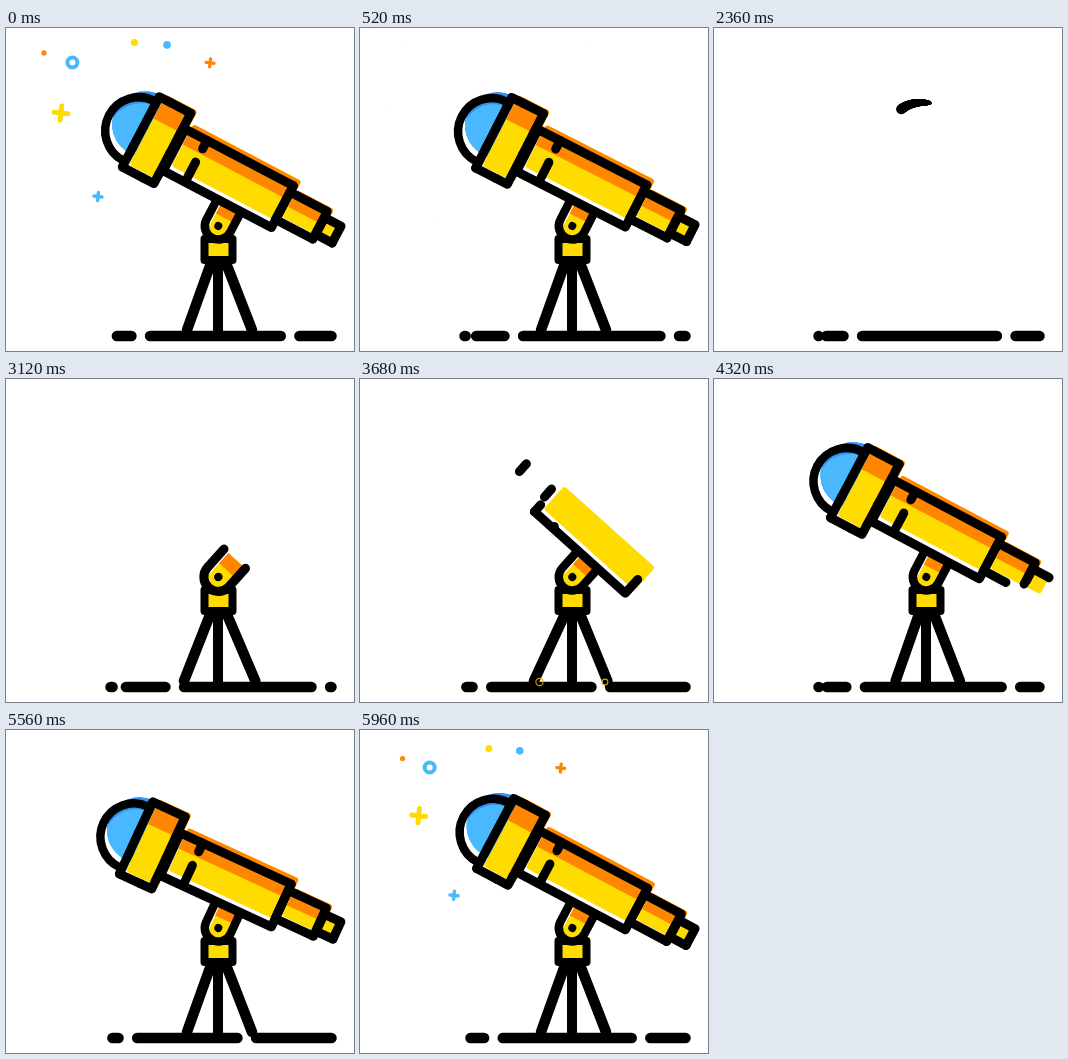
Write an HTML page with a canvas that moves like this. It is 348 by 323 pixels and loops after 6000 ms.

```html
<!DOCTYPE html>
<html lang="en">
<head>
<meta charset="utf-8">
<title>Telescope</title>
<style>
html, body { margin: 0; width: 100%; height: 100%; overflow: hidden; background: #fff; }
canvas { display: block; width: 348px; height: 323px; }
</style>
</head>
<body>
<canvas id="stage"></canvas>
<script>
const LOOP = 6000, START = 1320;
const BLACK = '#000', YELLOW = '#ffdc00', ORANGE = '#ff8600', BLUE = '#4ab8ff', DEEP = '#2f92f0';
const canvas = document.getElementById('stage');
const ratio = window.devicePixelRatio || 1;
canvas.width = 348 * ratio;
canvas.height = 323 * ratio;
const c = canvas.getContext('2d');

const clamp = x => Math.max(0, Math.min(1, x));
const mix = (a, b, p) => a + (b - a) * p;
const span = (t, a, b) => clamp((t - a) / (b - a));
const grow = (t, a, b) => {
  const p = span(t, a, b);
  return p * p * (3 - 2 * p);
};

// Growth from 0 to 1 that overshoots a little.
function pop(t, start, time = 300) {
  const p = span(t, start, start + time) - 1;
  return 1 + 2.7 * p ** 3 + 1.7 * p ** 2;
}

// Damped swing that begins at the given time.
function swing(t, start, half, decay, size, wave = Math.sin) {
  const s = t - start;
  return s < 0 ? 0 : size * wave(Math.PI * s / half) * Math.exp(-s / decay);
}

// Strokes the part of a polyline between two fractions of its length.
function line(points, width = 9, from = 0, to = 1) {
  if (to <= from) return;
  const total = points.slice(1).reduce((sum, [x, y], i) => sum + Math.hypot(x - points[i][0], y - points[i][1]), 0);
  c.beginPath();
  points.forEach(p => c.lineTo(...p));
  if (to - from < 1) {
    c.setLineDash([(to - from) * total, total * 2]);
    c.lineDashOffset = -from * total;
  }
  c.strokeStyle = BLACK;
  c.lineWidth = width;
  c.stroke();
  c.setLineDash([]);
}

function disc(x, y, r, color) {
  c.beginPath();
  c.arc(x, y, Math.max(0, r), 0, 7);
  c.fillStyle = color;
  c.fill();
}

function ring(x, y, r, width, color) {
  c.beginPath();
  c.arc(x, y, r, 0, 7);
  c.strokeStyle = color;
  c.lineWidth = width;
  c.stroke();
}

function panel(x, y, w, h, color, corners) {
  c.beginPath();
  c.roundRect(x, y, w, h, corners);
  c.fillStyle = color;
  c.fill();
}

// Each gap in the ground moves on by one stop per period.
const PERIOD = 1880, STOPS = [102, 114, 174, 315, 360];
const slowEnd = p => 1 - (1 - p) ** 2.4;
const EASES = [p => p, p => p ** 1.4, slowEnd, slowEnd];

function ground(t) {
  const run = t < 560 ? t + LOOP : t < 920 ? 6560 : t < 1360 ? t + 5640 : t;
  const phase = (run - 1360) % PERIOD / PERIOD;
  const end = 325.5;
  let x = 104.5;
  EASES.forEach((ease, i) => {
    const mid = mix(STOPS[i], STOPS[i + 1], ease(phase));
    const half = Math.max(0, Math.min(9.3, 4.7 + (mid - 110) * 0.6));
    if (mid - half >= x && x <= end) line([[x, 308], [Math.min(mid - half, end), 308]], 10.5);
    x = Math.max(x, mid + half);
  });
  if (x < end) line([[x, 308], [end, 308]], 10.5);
}

// The spark shoots up, hangs, then dives along a curve.
function flight(t) {
  if (t < 2120) return [216, 75 + 225 * (1 - span(t, 1360, 2120)) ** 4];
  const u = span(t, 2120, 2560) ** 2.6;
  const curve = (a, b, d) => mix(mix(a, b, u), mix(b, d, u), u);
  return [curve(216, 130, 206), curve(75, 64, 303)];
}

function spark(t) {
  if (t < 1360 || t > 2600) return;
  const size = mix(0.8, 5, span(t, 1360, 1560));
  for (let k = 0; k < 1; k += 0.01) {
    const when = t - 240 * k;
    if (when >= 1360) disc(...flight(when), size * mix(1, 0.2, k), BLACK);
  }
}

function puff(t, start, x, y, size) {
  const p = (t - start) / 240;
  if (p > 0 && p < 1) ring(x, y, size * (0.3 + p), 1.8 * (1 - p), '#d9a800');
}

function tripod(t) {
  const rise = grow(t, 2600, 2840);
  if (!rise) return;
  line([[212, 304], [212, mix(304, 234, rise)]], 10);
  const open = pop(t, 2940), kick = swing(t, 3560, 240, 350, 10);
  if (t > 2940) {
    line([[212 - 7 * open, 235], [212 - 31 * open - kick, 302]], 10.5);
    line([[212 + 8 * open, 235], [212 + 34 * open + kick * 0.2, 302]], 10.5);
  }
  const size = pop(t, 2780);
  if (size <= 0) return;
  c.save();
  c.translate(212.5, 232);
  c.scale(size, size);
  panel(-12, -22, 24, 20, YELLOW, 0);
  line([[-14, -21], [-14, 0], [14, 0], [14, -21], [-14, -21]], 8);
  c.restore();
}

function cradle(t) {
  const size = pop(t, 2900);
  if (size <= 0) return;
  const shape = new Path2D('M-13.5-23V0A13.5 13.5 0 0 0 13.5 0V-23');
  c.save();
  c.scale(size, size);
  c.fillStyle = '#fff';
  c.fill(shape);
  c.save();
  c.clip(shape);
  panel(-8, -24, 24, 40, YELLOW, 0);
  panel(-8, -24, 24, 14, ORANGE, 0);
  c.restore();
  c.strokeStyle = BLACK;
  c.lineWidth = 8.5;
  c.stroke(shape);
  disc(0, 0, 4, BLACK);
  c.restore();
}

// Yellow rises from the base of a part, then its shade comes down.
function fill([x0, y0, x1, y1], t, start, time, lift, shade) {
  const p = grow(t, start, start + time);
  if (!p) return;
  const dx = lift && 5, base = y1 - lift, top = mix(base, y0 - lift, p);
  panel(x0 + dx, top, x1 - x0, base - top, YELLOW, 3);
  const q = grow(t, start + time * 0.65, start + time * 1.3);
  if (q && shade) panel(x0 + dx, top, x1 - x0, shade * q, ORANGE, [3, 3, 0, 0]);
}

// Two strokes leave one left corner and meet at the opposite one.
function trace([x0, y0, x1, y1], t, start, time, lag) {
  line([[x0, y0], [x1, y0], [x1, y1]], 9, 0, span(t, start, start + time));
  line([[x0, y0], [x0, y1], [x1, y1]], 9, 0, span(t, start + lag, start + lag + time));
}

// Ten dashes around a part lengthen until they join.
function dashes([x0, y0, x1, y1], t, start) {
  const path = [[x0, y1], [x1, y1], [x1, y0], [x0, y0], [x0, y1]];
  for (let i = 0; i < 10; i++) {
    const begin = start + (i + 2) % 5 * 50;
    line(path, 9, i / 10, (i + span(t, begin, begin + 90)) / 10);
  }
}

function lens(t) {
  const size = pop(t, 3740);
  if (size > 0) {
    c.save();
    disc(-110.4, -56, 33 * size, DEEP);
    c.clip();
    disc(-108.5, -43.5, 33 * size, BLUE);
    c.restore();
  }
  const p = grow(t, 3820, 4140);
  if (!p) return;
  c.beginPath();
  c.arc(-113, -47.3, 33.5, Math.PI / 2, Math.PI * (0.5 + p));
  c.strokeStyle = BLACK;
  c.lineWidth = 8.5;
  c.stroke();
}

const EYEPIECE = [92, -57, 110.5, -38];
const TUBE = [49.5, -63.5, 91.5, -32.5];
const BODY = [-72.6, -70.5, 49.5, -23.3];
const BARREL = [-110.6, -87, -75, -7.6];

function scope(t) {
  lens(t);
  fill(EYEPIECE, t, 4160, 140, 0, 0);
  fill(TUBE, t, 3960, 180, 5, 19);
  fill(BODY, t, 3420, 430, 8, 23);
  fill(BARREL, t, 3690, 220, 5, 27);
  const [x0, y0, x1, y1] = BODY;
  trace([x0, y1, x1, y0], t, 3440, 290, 225);
  line([[-48, y1 - 1], [-48, -46]], 9, 0, span(t, 3660, 4000));
  line([[-48, y0], [-48, -61]], 9, 0, span(t, 3760, 4000));
  dashes(BARREL, t, 3640);
  trace(TUBE, t, 4050, 300, 40);
  trace(EYEPIECE, t, 4180, 280, 40);
}

// Each star: colour, kind, place, size, line width.
const STARS = [
  [ORANGE, 'dot', 38, 25, 2.6],
  [BLUE, 'ring', 66.5, 34.5, 5, 4],
  [YELLOW, 'plus', 55, 85, 7, 5],
  [BLUE, 'plus', 92, 168.5, 4, 3.5],
  [YELLOW, 'dot', 128.5, 14.5, 3.5],
  [BLUE, 'dot', 161, 17, 3.8],
  [ORANGE, 'plus', 204, 35, 4, 3.3]
];

function stars(t) {
  const far = 1.4 - 0.4 * Math.exp((LOOP - t) / 355);
  const size = span(t, 5580, 5780) * (1 - grow(t, 6220, 6560));
  if (!size) return;
  for (const [color, kind, x, y, r, width] of STARS) {
    c.save();
    c.translate(mix(135, x, far), mix(100, y, far));
    c.scale(size, size);
    if (kind === 'dot') disc(0, 0, r, color);
    else if (kind === 'ring') ring(0, 0, r, width, color);
    else {
      c.rotate(0.12 + (t - LOOP) / 2500);
      c.lineWidth = width;
      c.strokeStyle = color;
      c.stroke(new Path2D(`M${-r} 0H${r}M0 ${-r}V${r}`));
    }
    c.restore();
  }
}

function tilt(t) {
  const settle = swing(Math.max(t, 3680), 3680, 310, 230, 15, Math.cos);
  return 27 + settle - swing(t, 5300, 400, 500, 4.2);
}

function draw(now) {
  const t = now % LOOP;
  const show = t < START ? t + LOOP : t;
  c.setTransform(ratio, 0, 0, ratio, 0, 0);
  c.fillStyle = '#fff';
  c.fillRect(0, 0, 348, 323);
  c.lineCap = c.lineJoin = 'round';
  stars(show);
  ground(t);
  spark(show);
  tripod(show);
  puff(show, START, 216, 299.5, 4);
  puff(show, 2540, 212, 308, 12);
  puff(show, 3580, 179.5, 303, 5);
  puff(show, 3580, 245, 303, 4);
  c.save();
  c.translate(212.3, 198);
  c.rotate(tilt(show) * Math.PI / 180);
  cradle(show);
  c.translate(mix(0.8, -1.8, span(show, 3680, 4000)), 0);
  scope(show);
  c.restore();
}

const begin = performance.now();
function tick() {
  draw(performance.now() - begin);
  requestAnimationFrame(tick);
}
tick();
</script>
</body>
</html>
```
